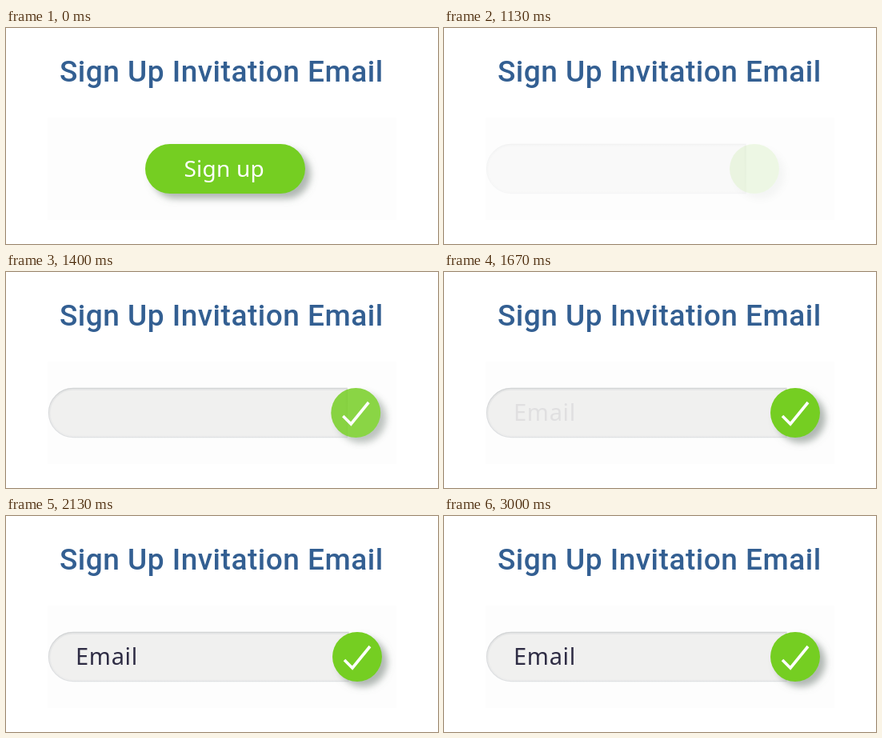
Recreate the animation shown at these times as an HTML page. Size 540 by 270 pixels, loop 3070 ms.

```html
<!DOCTYPE html>
<html lang="en">
<head>
<meta charset="utf-8">
<title>Sign Up Invitation Email</title>
<style>
  html, body { margin: 0; width: 100%; height: 100%; overflow: hidden; background: #fff; }
  svg { display: block; width: 100%; height: 100%; }
  .title { font: 500 37px Roboto, sans-serif; letter-spacing: 0.5px; fill: #335f92; }
  .label { font: 400 28px "Noto Sans", sans-serif; letter-spacing: 0.2px; fill: #fff; }
  .hint { font: 400 29px "Noto Sans", sans-serif; letter-spacing: 0.7px; fill: #2e2c44; }
</style>
</head>
<body>
<svg viewBox="0 0 540 270">
  <defs>
    <filter id="shadow" x="-30%" y="-40%" width="180%" height="190%">
      <feDropShadow dx="7" dy="6.5" stdDeviation="4.5" flood-color="#6f7d74" flood-opacity=".55"/>
    </filter>
    <linearGradient id="edge" gradientUnits="userSpaceOnUse" x1="0" y1="145" x2="0" y2="207">
      <stop offset="0" stop-color="#d2d4d5"/>
      <stop offset="1" stop-color="#dfe1e3"/>
    </linearGradient>
    <linearGradient id="inner" gradientUnits="userSpaceOnUse" x1="0" y1="145" x2="0" y2="207">
      <stop offset="0" stop-color="#e3e4e4"/>
      <stop offset="1" stop-color="#ededed"/>
    </linearGradient>
  </defs>
  <rect x="52" y="112" width="436" height="128" fill="#fdfdfd"/>
  <text class="title" x="67" y="67">Sign Up Invitation Email</text>

  <g id="button">
    <rect x="174" y="145" width="200" height="62" rx="31" fill="#75ce20" filter="url(#shadow)"/>
    <text class="label" x="222.5" y="186">Sign up</text>
  </g>

  <g id="form">
    <g id="field">
      <path id="pill" fill="#f0f0ef" stroke="url(#edge)" stroke-width="1.3"/>
      <path id="rim" fill="none" stroke="url(#inner)" stroke-width="1.5"/>
    </g>
    <text id="hint" class="hint" x="87" y="186">Email</text>
    <g id="knob">
      <circle r="31" fill="#75ce20" filter="url(#shadow)"/>
      <path id="tick" d="M-16 4L-6 14L16 -13" fill="none" stroke="#fff" stroke-width="3.6"/>
    </g>
  </g>
</svg>
<script>
  const LOOP = 3070, STEP = 200 / 3;
  const OPEN = 17, TYPE = 25, SETTLE = 7;
  const $ = id => document.getElementById(id);
  const clamp = v => Math.max(0, Math.min(1, v));

  // Left-rounded bar with a flat right end
  const bar = (right, inset) => {
    const r = 30.5 - inset;
    return `M${right} ${176 - r}H84A${r} ${r} 0 0 0 84 ${176 + r}H${right}Z`;
  };

  function draw(ms) {
    const step = Math.floor((ms + 4) / STEP);
    const k = step - OPEN;
    const open = k >= 0;
    $("button").style.display = open ? "none" : "";
    $("form").style.display = open ? "" : "none";
    if (!open) return;

    const cx = 439 - 51 * Math.pow(1 - clamp(k / SETTLE), 4);
    $("pill").setAttribute("d", bar(cx - 11, 0));
    $("rim").setAttribute("d", bar(cx - 12, 1.4));
    $("field").setAttribute("opacity", clamp(0.25 + 0.19 * k));
    $("knob").setAttribute("transform", `translate(${cx} 176)`);
    $("knob").setAttribute("opacity", clamp(0.11 + 0.1825 * k));
    $("tick").setAttribute("opacity", clamp(k / 4));

    const fade = step < TYPE ? 0 : clamp(0.08 + 0.135 * (step - TYPE));
    $("hint").setAttribute("opacity", fade);
  }

  const start = performance.now();
  function tick() {
    draw((performance.now() - start) % LOOP);
    requestAnimationFrame(tick);
  }
  tick();
</script>
</body>
</html>
```
